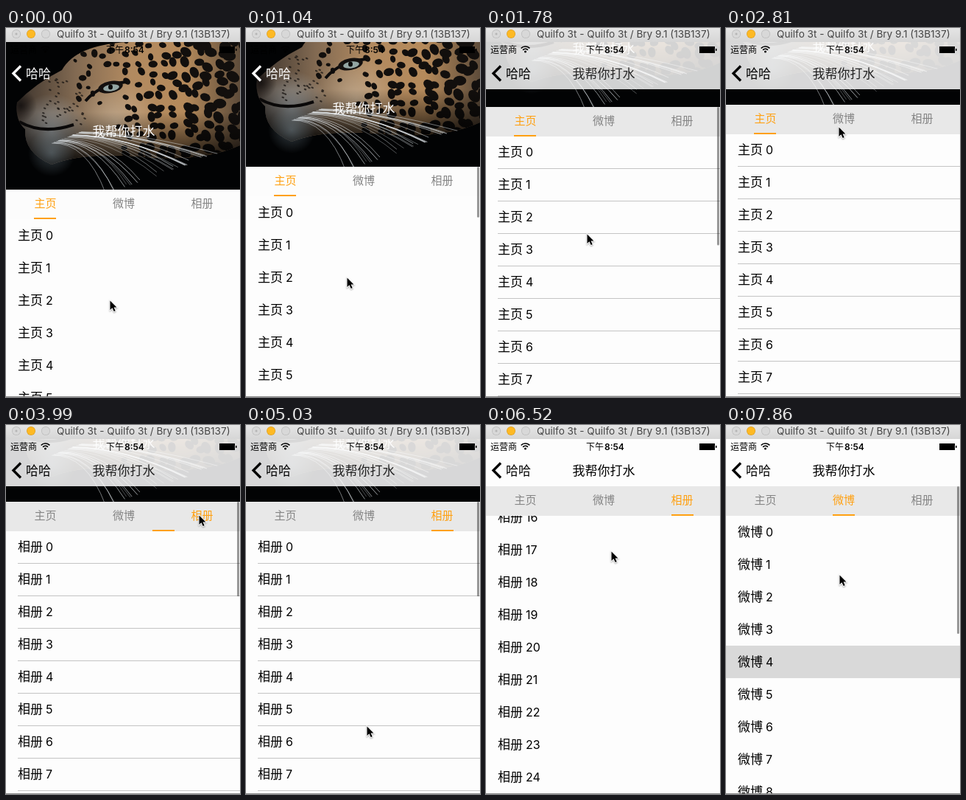
Recreate the animation shown at these times as an HTML page with a canvas. Size 318x500 px, loop 8000 ms.

```html
<!DOCTYPE html>
<html lang="zh">
<head>
<meta charset="utf-8">
<style>
html, body { margin: 0; width: 100%; height: 100%; overflow: hidden; background: #fdfdfd; }
canvas { display: block; width: 318px; height: 500px; }
</style>
</head>
<body>
<canvas id="stage" width="318" height="500"></canvas>
<script>
const W = 318, H = 500, LOOP = 8000, STEP = 147.9;
const TOP = 19, NAV = 83, PHOTO = 200, TAB_H = 40, ROW = 44, COLLAPSE = 136;
const HAN = '"Noto Sans CJK SC", "Noto Sans CJK", sans-serif';
const LATIN = 'Inter, "Liberation Sans", sans-serif';
const TABS = [{ name: '主页', rows: 18 }, { name: '微博', rows: 20 }, { name: '相册', rows: 25 }];

const ctx = document.getElementById('stage').getContext('2d');

// The screen refreshes in steps; all motion is a function of the step k.
const ramp = (k, a, b) => Math.min(1, Math.max(0, (k - a) / (b - a)));
const smooth = u => u * u * (3 - 2 * u);
const settle = u => 1 - (1 - u) ** 2;

const drag = k => 90.5 * ramp(k, 2, 10) ** 2.28;

function scrollAt(k) {
  if (k >= 47) return COLLAPSE;
  const o = drag(k) + 25 * settle(ramp(k, 10, 13))
    + 698 * ramp(k, 34, 38) ** 1.8 + 46.5 * settle(ramp(k, 38, 42));
  return Math.round(o * 2) / 2;
}

// Moves: first step, last step, x, y
const MOVES = [[15, 19, 153, 134], [23, 26, 262, 122], [29, 33, 164, 408], [34, 38, 170, 171],
  [44, 46, 157, 100], [47, 50, 157, 316], [50, 52, 154, 194], [52, 53, 154, 203]];

function pointerAt(k) {
  let x = 141 - 4 * ramp(k, 2, 7), y = 369 - drag(k);
  for (const [a, b, tx, ty] of MOVES) {
    const u = smooth(ramp(k, a, b));
    x += (tx - x) * u;
    y += (ty - y) * u;
  }
  return [Math.round(x), Math.round(y)];
}

const tabAt = k => k < 22 ? 0 : k < 27 ? 1 : k < 47 ? 2 : 1;
const lineAt = k => ramp(k, 21, 23) + ramp(k, 26, 28) - ramp(k, 46, 48);
const barAt = k => Math.max(...[[3, 14], [22, 24], [27, 29], [34, 42], [47, 60]]
  .map(([a, b]) => ramp(k, a - 1, a) - ramp(k, b, b + 2)));

function text(str, x, y, font, color, align = 'left') {
  ctx.font = font;
  ctx.fillStyle = color;
  ctx.textAlign = align;
  ctx.fillText(str, x, y);
}

function rect(x, y, w, h, color) {
  ctx.fillStyle = color;
  ctx.fillRect(x, y, w, h);
}

function oval(c, x, y, rx, ry, turn, color) {
  c.beginPath();
  c.ellipse(x, y, rx, ry, turn, 0, Math.PI * 2);
  c.fillStyle = color;
  c.fill();
}

function glow(c, x, y, r, rgb, a) {
  const g = c.createRadialGradient(x, y, 0, x, y, r);
  g.addColorStop(0, `rgba(${rgb},${a})`);
  g.addColorStop(1, `rgba(${rgb},0)`);
  c.fillStyle = g;
  c.fillRect(x - r, y - r, r * 2, r * 2);
}

function curve(c, x0, y0, cx, cy, x1, y1) {
  c.beginPath();
  c.moveTo(x0, y0);
  c.quadraticCurveTo(cx, cy, x1, y1);
  c.stroke();
}

// Simplified big cat in profile, painted once
function paintPhoto() {
  const cv = document.createElement('canvas');
  cv.width = W;
  cv.height = PHOTO;
  const c = cv.getContext('2d');
  let seed = 11;
  const rnd = () => (seed = seed * 16807 % 2147483647) / 2147483647;
  c.fillStyle = '#020304';
  c.fillRect(0, 0, W, PHOTO);

  c.save();
  c.beginPath();
  c.moveTo(W, 0);
  c.lineTo(165, 0);
  c.quadraticCurveTo(95, 4, 76, 38);
  c.quadraticCurveTo(40, 56, 15, 82);
  c.quadraticCurveTo(12, 106, 26, 118);
  c.quadraticCurveTo(24, 150, 62, 166);
  c.quadraticCurveTo(110, 148, 190, 156);
  c.quadraticCurveTo(270, 162, W, 140);
  c.clip();
  const fur = c.createLinearGradient(20, 0, W, 0);
  ['#41372f', '#826a52', '#b28a60', '#b58a5b', '#5e4c3a'].forEach((v, i) => fur.addColorStop(i / 4, v));
  c.fillStyle = fur;
  c.fillRect(0, 0, W, PHOTO);
  glow(c, 62, 122, 52, '165,172,176', 0.85);
  glow(c, 150, 108, 60, '205,188,165', 0.6);
  glow(c, 20, 86, 22, '15,12,12', 0.8);

  for (let y = 2; y < 160; y += 14) {
    for (let x = 100; x < W + 8; x += 16) {
      const px = x + rnd() * 12 - 6, py = y + rnd() * 10 - 5, r = 2 + (px - 95) / 70 + rnd() * 2;
      if (Math.hypot(px - 142, py - 62) > 22 && (px > 150 || py < 85))
        oval(c, px, py, r * 1.35, r, rnd() * 2 - 0.5, '#120f0d');
    }
  }
  for (let i = 0; i < 40; i++)
    oval(c, 48 + rnd() * 66, 50 + rnd() * 70, 1.9, 1.1, 0.4, 'rgba(25,20,18,.75)');

  c.strokeStyle = '#0d0b0b';
  c.lineWidth = 4;
  curve(c, 18, 108, 50, 126, 92, 112);
  curve(c, 108, 80, 126, 58, 164, 54);
  oval(c, 142, 61, 17, 8, -0.2, '#14100f');
  oval(c, 143, 62, 11, 4.5, -0.15, '#93a5a3');
  oval(c, 142, 61, 3, 3.6, 0, '#0a0a0a');

  const shade = c.createLinearGradient(0, 95, 0, 162);
  shade.addColorStop(0, 'rgba(0,0,0,0)');
  shade.addColorStop(1, 'rgba(0,0,0,.85)');
  c.fillStyle = shade;
  c.fillRect(0, 95, W, 100);
  c.restore();

  glow(c, 62, 150, 32, '150,175,190', 0.35);
  c.lineWidth = 0.8;
  for (let i = 0; i < 26; i++) {
    const a = rnd(), x = 60 + a * 46;
    c.strokeStyle = `rgba(232,238,242,${0.3 + rnd() * 0.6})`;
    curve(c, x, 138 - a * 18, x + 45 + a * 40, 136 - a * 14, 120 + a * 165 + rnd() * 16, 208 - a * 62);
  }
  return cv;
}
const photo = paintPhoto();

function drawList(tab, o, picked) {
  // Hairlines only land on a visible pixel at half-point offsets
  const lines = o % 1 !== 0;
  for (let i = 0; i < tab.rows; i++) {
    const y = Math.floor(TOP + PHOTO + TAB_H + i * ROW - o);
    if (y < TOP - ROW || y > H) continue;
    if (i === picked) rect(0, y, W, ROW, '#d9d9d9');
    text(tab.name, 16, y + 28, '17px ' + HAN, '#000');
    text(i, 54, y + 28, '16px ' + LATIN, '#000');
    if (lines) rect(16, y + ROW, W, 1, '#c4c4c4');
  }
}

function drawTabs(y, active, pos, grey) {
  rect(0, y, W, TAB_H, grey ? '#e8e8e8' : '#fcfcfc');
  TABS.forEach((t, i) => text(t.name, 53.5 + i * 106.5, y + 23.5, '15px ' + HAN,
    i === active ? '#ffa011' : '#858585', 'center'));
  rect(Math.round(38 + pos * 107), y + 38, 30, 2, '#ffa011');
}

function drawBar(tab, o, y, alpha) {
  const view = H - 1 - TOP, k = view / (PHOTO + TAB_H + tab.rows * ROW);
  const start = Math.max(y, TOP + o * k), end = Math.min(496, TOP + (o + view) * k);
  ctx.beginPath();
  ctx.roundRect(314, start, 3, end - start, 1.5);
  ctx.fillStyle = `rgba(0,0,0,${0.4 * alpha})`;
  ctx.fill();
}

function drawNav(fade) {
  rect(0, TOP, W, NAV - TOP, `rgba(253,253,253,${fade})`);
  const tint = fade ? '#000' : '#fff';
  ctx.strokeStyle = tint;
  ctx.lineWidth = 3.4;
  ctx.beginPath();
  ctx.moveTo(20, 51.5);
  ctx.lineTo(10, 61.5);
  ctx.lineTo(20, 71.5);
  ctx.stroke();
  text('哈哈', 27, 67.5, '17px ' + HAN, tint);
  text('我帮你打水', 160, 67.5, '17px ' + HAN, `rgba(0,0,0,${fade})`, 'center');

  text('运营商', 6, 33.5, '12px ' + HAN, '#000');
  text('下午', 136, 33.5, '500 12px ' + HAN, '#000');
  text('8:54', 161, 33.5, '600 12px ' + LATIN, '#000');
  ctx.strokeStyle = '#000';
  ctx.lineWidth = 1.7;
  for (const r of [4.6, 8]) {
    ctx.beginPath();
    ctx.arc(53.5, 33, r, -Math.PI * 0.76, -Math.PI * 0.24);
    ctx.stroke();
  }
  oval(ctx, 53.5, 32, 1.5, 1.5, 0, '#000');
  rect(290, 25, 21, 9, '#000');
  rect(312, 28, 1.5, 3, '#000');
}

function drawWindow() {
  const g = ctx.createLinearGradient(0, 0, 0, TOP);
  g.addColorStop(0, '#e5e5e5');
  g.addColorStop(1, '#d6d6d6');
  rect(0, 0, W, TOP, g);
  ['#b9b9b9', '#dd9f22', '#b9b9b9'].forEach((edge, i) => {
    oval(ctx, 14 + i * 20, 8, 6, 6, 0, edge);
    oval(ctx, 14 + i * 20, 8, 5.3, 5.3, 0, i === 1 ? '#fdb924' : '#d8d8d8');
  });
  oval(ctx, 14, 8, 1.5, 1.5, 0, '#b5b5b5');
  text('Quilfo 3t - Quilfo 3t / Bry 9.1 (13B137)', 69, 13, '13.6px ' + LATIN, '#454545');
  rect(0, H - 1, W, 1, '#8c8c8c');
}

function drawPointer(x, y) {
  const p = [[0, 0], [0, 14.5], [3.4, 11.4], [6, 17], [8.4, 16], [5.9, 10.6], [10.4, 10.4]];
  ctx.save();
  ctx.translate(x + 0.5, y + 0.5);
  ctx.scale(0.86, 0.86);
  ctx.beginPath();
  p.forEach(v => ctx.lineTo(...v));
  ctx.closePath();
  ctx.lineWidth = 2;
  ctx.strokeStyle = '#fff';
  ctx.shadowColor = 'rgba(0,0,0,.35)';
  ctx.shadowBlur = 2;
  ctx.shadowOffsetY = 1;
  ctx.stroke();
  ctx.shadowColor = 'transparent';
  ctx.fillStyle = '#000';
  ctx.fill();
  ctx.restore();
}

function draw(t) {
  const k = Math.floor((t + 5) / STEP);
  const o = scrollAt(k), active = tabAt(k), tab = TABS[active];
  const lift = Math.min(o, COLLAPSE);
  const fade = lift > COLLAPSE / 2 ? lift / COLLAPSE : 0;
  const tabY = Math.round(TOP + PHOTO - lift);

  rect(0, 0, W, H, '#fdfdfd');
  drawList(tab, o, k >= 50 ? 4 : -1);
  ctx.drawImage(photo, 0, tabY - PHOTO);
  text('我帮你打水', 160, tabY - 73.5, '17px ' + HAN, '#fff', 'center');
  drawTabs(tabY, active, lineAt(k), fade > 0);
  drawBar(tab, o, tabY, barAt(k));
  drawNav(fade);
  drawWindow();
  drawPointer(...pointerAt(k));
}

const begin = performance.now();
function tick() {
  draw((performance.now() - begin) % LOOP);
  requestAnimationFrame(tick);
}
tick();
</script>
</body>
</html>
```
